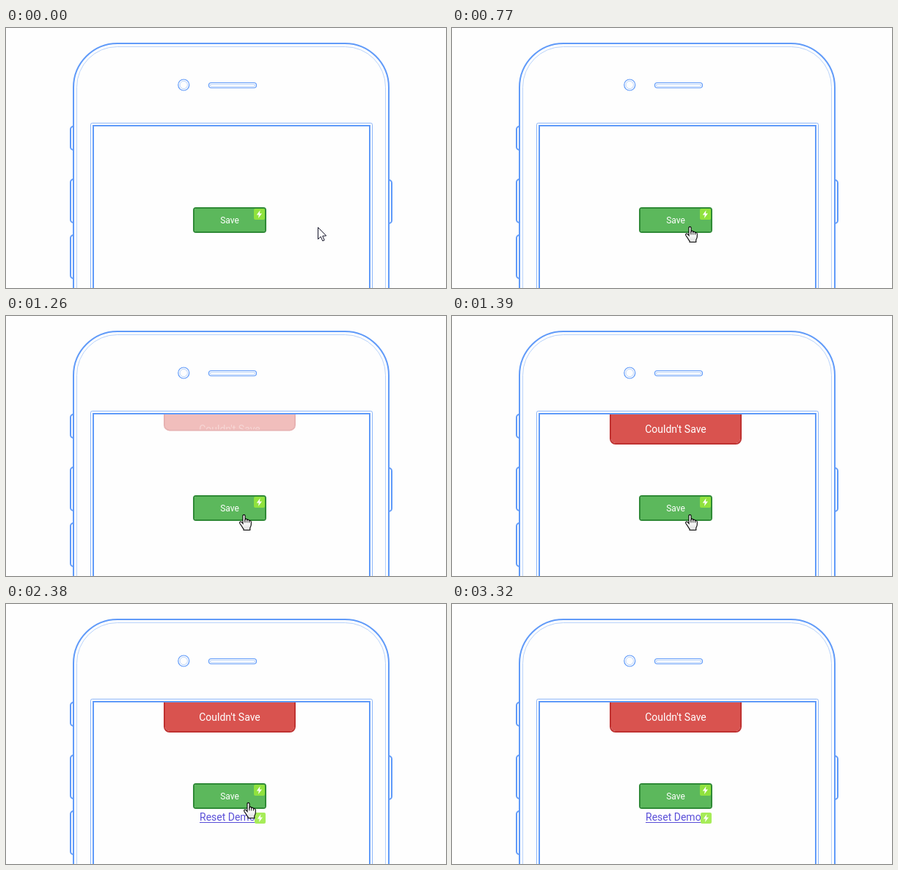
Recreate the animation shown at these times as an HTML page with a canvas. Size 600 px wide and 354 px high, loop 3780 ms.

```html
<!DOCTYPE html>
<html lang="en">
<head>
<meta charset="utf-8">
<title>Save demo</title>
<style>
html, body { margin: 0; width: 100%; height: 100%; overflow: hidden; background: #fefefe; }
canvas { display: block; width: 600px; height: 354px; }
</style>
</head>
<body>
<canvas id="stage" width="600" height="354"></canvas>
<script>
const ctx = document.getElementById('stage').getContext('2d');
const LOOP = 3780;
const BLUE = '#619bf9', MID = '#8db6f8', PALE = '#b9d3fb', PAPER = '#fefefe';
const FONT = 'Roboto, Arial, sans-serif';

const smooth = p => p * p * (3 - 2 * p);
const lerp = (a, b, p) => a + (b - a) * p;

// Share of a stepped move done at time t; the first step shows at `start`.
function steps(t, start, gap, count) {
  if (t < start) return 0;
  return Math.min(1, (Math.floor((t - start) / gap) + 1) / count);
}

function round(x, y, w, h, r, color, width) {
  ctx.beginPath();
  ctx.roundRect(x, y, w, h, r);
  ctx.strokeStyle = color;
  ctx.lineWidth = width;
  ctx.stroke();
}

function fillRound(x, y, w, h, r, color) {
  ctx.beginPath();
  ctx.roundRect(x, y, w, h, r);
  ctx.fillStyle = color;
  ctx.fill();
}

function panel(x, y, w, h, r, fill, edge) {
  fillRound(x + 2, y + 2, w - 4, h - 4, Math.max(0, r - 2), fill);
  round(x + 1, y + 1, w - 2, h - 2, r - 1, edge, 2);
}

function ring(r, color, width) {
  ctx.beginPath();
  ctx.arc(242.3, 77.5, r, 0, Math.PI * 2);
  ctx.strokeStyle = color;
  ctx.lineWidth = width;
  ctx.stroke();
}

function label(text, x, y, size, color, align = 'center') {
  ctx.font = `${size}px ${FONT}`;
  ctx.textAlign = align;
  ctx.fillStyle = color;
  ctx.fillText(text, x, y);
}

function phone() {
  for (const [y, h] of [[134, 32], [206, 59], [282, 59]]) round(88, y, 12, h, 4, BLUE, 2);
  round(514, 207, 12, 59, 4, BLUE, 2);
  fillRound(92, 21, 430, 420, 60, PAPER);
  round(92, 21, 430, 420, 60, BLUE, 2);
  round(96.5, 25.5, 421, 420, 55, PALE, 1);
  ring(7.5, BLUE, 1.2);
  ring(5.2, PALE, 1);
  round(276.5, 74.5, 65, 7, 3.5, BLUE, 1.2);
  round(278.5, 76.5, 61, 3, 1.5, PALE, 1);
  round(115.5, 129.5, 384, 300, 2, MID, 1);
  round(119, 133, 377, 300, 0, BLUE, 2);
}

function badge(x, y, color) {
  fillRound(x, y, 15, 15, 2, color);
  shape(x, y, [8.6, 2, 3.8, 8.4, 6.8, 8.4, 6, 13, 11, 6.4, 7.8, 6.4]);
  ctx.fillStyle = '#fff';
  ctx.fill();
}

function shape(x, y, pts) {
  ctx.beginPath();
  for (let i = 0; i < pts.length; i += 2) ctx.lineTo(x + pts[i], y + pts[i + 1]);
  ctx.closePath();
}

function saveButton() {
  panel(255, 244, 100, 35, 4, '#5cb85c', '#2f8a36');
  label('Save', 305, 266, 12, '#fff');
  badge(338, 246, '#90e23e');
}

function banner(p) {
  if (!p) return;
  const bottom = lerp(134, 175, p ** 0.62);
  ctx.save();
  ctx.beginPath();
  ctx.rect(210, 134, 190, 50);
  ctx.clip();
  ctx.globalAlpha = p;
  panel(215, 110, 180, bottom - 110, 8, '#d9534f', '#bf3231');
  ctx.beginPath();
  ctx.rect(217, 134, 176, bottom - 136);
  ctx.clip();
  label("Couldn't Save", 305, 159, 14, '#fff');
  ctx.restore();
}

function resetLink(p) {
  if (!p) return;
  ctx.globalAlpha = p;
  label('Reset Demo', 264, 295, 14, '#5a4fd8', 'left');
  ctx.fillRect(264, 297, 76, 1);
  badge(339, 284, '#a6ec58');
  ctx.globalAlpha = 1;
}

function arrow(x, y) {
  shape(x + 0.5, y + 0.5, [0, 0, 0, 16, 3.7, 12.6, 6.3, 18.4, 8.7, 17.4, 6.2, 11.7, 11.2, 11.4]);
  ctx.fillStyle = '#fff';
  ctx.fill();
  ctx.strokeStyle = '#15152a';
  ctx.lineWidth = 1;
  ctx.stroke();
}

function hand(x, y) {
  ctx.save();
  ctx.translate(x - 6, y);
  const body = new Path2D('M5 12.5V2Q5 .6 6.5 .6T8 2V7Q8.3 6 9.5 6.2T10.8 7.6Q11.2 7 12.2 7.2' +
    'T13.5 8.7Q14.2 8.2 15.2 8.7T16.3 10.5V14Q16.3 16 14.8 18.5V21.5H6V19.8' +
    'Q4.5 18.4 3.5 16.2L.9 12.5Q.1 11 1.2 10.3T3.6 10.9Z');
  const shade = ctx.createLinearGradient(0, 10, 0, 22);
  shade.addColorStop(0, '#fff');
  shade.addColorStop(1, '#dcdcdc');
  ctx.fillStyle = shade;
  ctx.fill(body);
  ctx.strokeStyle = '#000';
  ctx.lineWidth = 1.1;
  ctx.stroke(body);
  ctx.lineWidth = 0.9;
  ctx.stroke(new Path2D('M8 7V11.5M10.8 7.6V11.5M13.5 8.7V11.5'));
  ctx.restore();
}

function cursor(t) {
  let x, y;
  if (t < 2380) {
    const p = 1 - (1 - steps(t, 250, 56, 10)) ** 1.53;
    x = lerp(425, 324, p);
    y = lerp(271, 270, p ** 3);
  } else if (t < 3140) {
    const p = smooth(steps(t, 2380, 60, 9));
    x = lerp(324, 496, p);
    y = lerp(270, 294, p ** 1.3);
  } else if (t < 3320) {
    const p = steps(t, 3140, 60, 3) ** 1.5;
    x = lerp(496, 567, p);
    y = lerp(294, 343, p);
  } else return;
  x = Math.round(x);
  y = Math.round(y);
  (x <= 355 ? hand : arrow)(x, y);
}

function draw(t) {
  ctx.fillStyle = PAPER;
  ctx.fillRect(0, 0, 600, 354);
  phone();
  const shown = steps(t, 1200, 63, 4);
  banner(shown && 1 - (1 - shown) ** 1.65);
  saveButton();
  resetLink(steps(t, 1940, 70, 3));
  cursor(t);
}

const begin = performance.now();
function frame() {
  draw((performance.now() - begin) % LOOP);
  requestAnimationFrame(frame);
}
frame();
</script>
</body>
</html>
```
